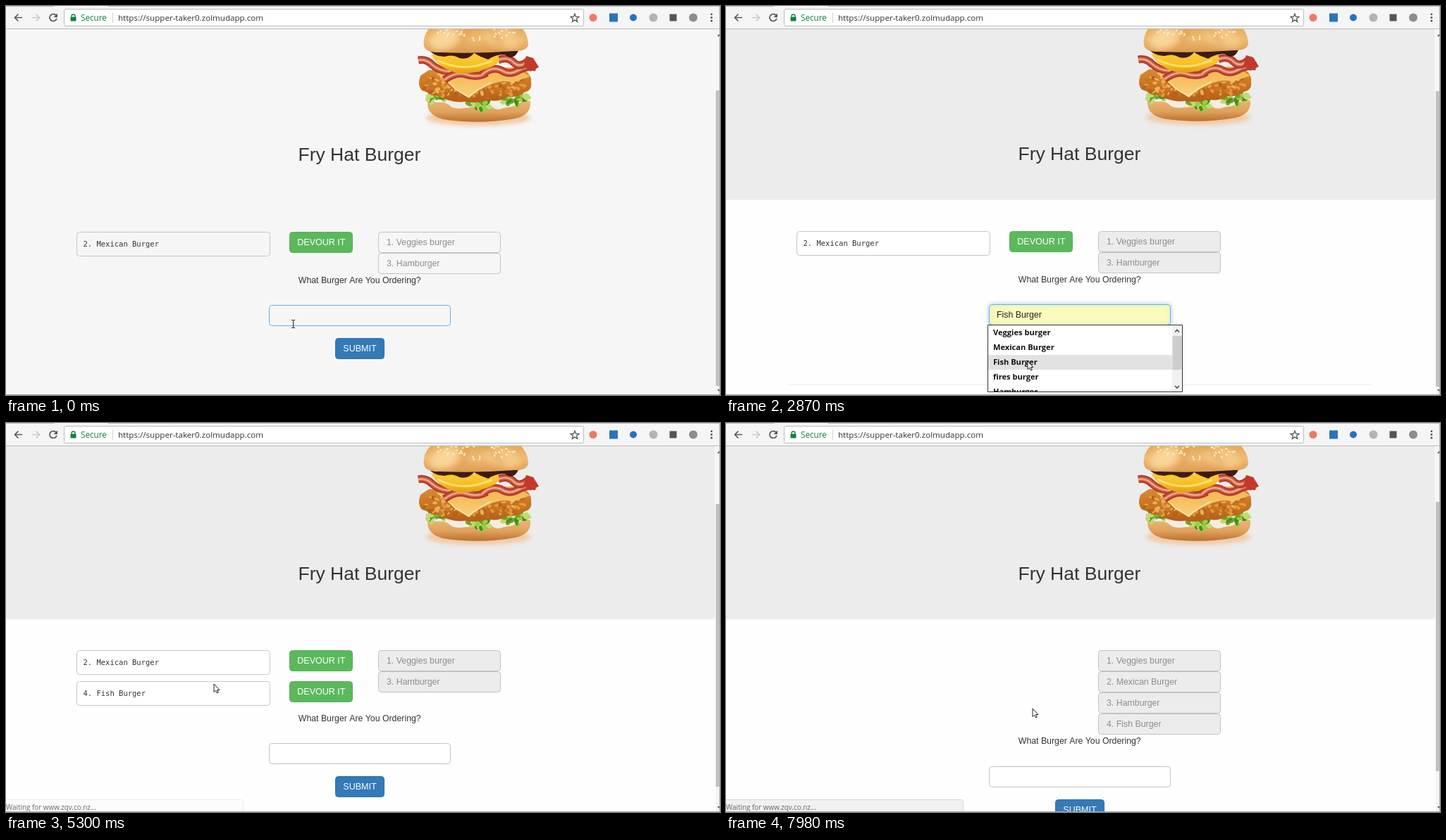
Animation, 1013 px wide and 553 px high, one loop 8000 ms. Source, as an HTML page with a canvas:

```html
<!DOCTYPE html>
<html lang="en">
<head>
<meta charset="utf-8">
<title>Burger list</title>
<style>
html, body { margin: 0; width: 100%; height: 100%; overflow: hidden; background: #fff; }
canvas { display: block; width: 1013px; height: 553px; }
</style>
</head>
<body>
<canvas id="stage" width="1013" height="553"></canvas>
<script>
const LOOP = 8000;
const W = 1013, H = 553;
const ctx = document.getElementById('stage').getContext('2d');

const SANS = '"Liberation Sans", Arial, sans-serif';
const UI = '"Open Sans", "Noto Sans", sans-serif';
const MONO = '"DejaVu Sans Mono", "Noto Sans Mono", monospace';
const HOST = 'supper-taker0.zolmudapp.com';
const WAIT_HOST = 'Waiting for ' + HOST + '...';
const WAIT_PIC = 'Waiting for www.zqv.co.nz...';
const CONNECT = 'Establishing secure connection...';

const VEG = '1. Veggies burger', MEX = '2. Mexican Burger';
const HAM = '3. Hamburger', FISH = '4. Fish Burger';
const CHOICES = ['Veggies burger', 'Mexican Burger', 'Fish Burger', 'fires burger', 'Hamburger'];

// Each page: start time, waiting burgers, eaten burgers, scrollbar thumb length and rate
const PAGES = [
  { at: 0, todo: [MEX], done: [VEG, HAM], thumb: 420, rate: 0.79 },
  { at: 4620, todo: [MEX, FISH], done: [VEG, HAM], thumb: 402, rate: 0.757 },
  { at: 6100, todo: [FISH], done: [VEG, MEX, HAM], thumb: 400, rate: 0.757 },
  { at: 7000, todo: [], done: [VEG, MEX, HAM, FISH], thumb: 383, rate: 0.72 }
];
const SCROLL = [[0, 91], [159, 91], [160, 92], [4619, 92], [4620, 0], [5140, 0], [5290, 88.5],
  [6099, 88.5], [6100, 0], [6190, 0], [6320, 88.5], [6999, 88.5], [7000, 0], [7250, 0], [7400, 88.5]];
const POINTER_X = [[160, 407], [860, 430], [1270, 430], [1850, 436], [2010, 436], [2440, 432],
  [2900, 428], [3540, 428], [3880, 484], [4500, 484], [4750, 293], [5140, 293], [5300, 295],
  [5450, 295], [5840, 416], [6900, 416], [7560, 443], [7860, 440], [7970, 435]];
const POINTER_Y = [[160, 452], [860, 440], [1270, 440], [1850, 436], [2010, 436], [2440, 462],
  [2900, 506], [3540, 506], [3880, 488], [4500, 488], [4750, 368], [5140, 368], [5300, 371],
  [5450, 371], [5840, 347], [6900, 347], [7560, 408], [7860, 408], [7970, 406]];
const POINTER_KIND = [[0, 'beam'], [2200, 'arrow'], [3800, 'hand'], [4620, 'arrow'], [5750, 'hand'], [6950, 'arrow']];
const STATUS = [[0, ''], [3950, WAIT_HOST, '#f2f2f2'], [4620, CONNECT, '#f2f2f2'], [5140, WAIT_PIC, '#fcfcfc'],
  [5570, ''], [5840, WAIT_HOST, '#f2f2f2'], [6190, WAIT_PIC, '#fcfcfc'], [6330, WAIT_HOST, '#fcfcfc'],
  [7000, CONNECT, '#f2f2f2'], [7250, WAIT_HOST, '#f1f1f1'], [7860, WAIT_PIC, '#f1f1f1']];
const BUSY = [[0, false], [3950, true], [5140, false], [5840, true], [6190, false], [6330, true], [7860, false]];

const lastOf = (list, t) => list.filter(k => k[0] <= t).pop();

function tween(keys, t) {
  if (t <= keys[0][0]) return keys[0][1];
  for (let i = 1; i < keys.length; i++) {
    const [a, va] = keys[i - 1], [b, vb] = keys[i];
    if (t < b) {
      const p = (t - a) / (b - a);
      return va + (vb - va) * p * p * (3 - 2 * p);
    }
  }
  return keys[keys.length - 1][1];
}

function rect(c, x, y, w, h) {
  ctx.fillStyle = c;
  ctx.fillRect(x, y, w, h);
}

function box(x, y, w, h, r, fill, line) {
  ctx.beginPath();
  ctx.roundRect(x, y, w, h, r);
  if (fill) { ctx.fillStyle = fill; ctx.fill(); }
  if (line) { ctx.strokeStyle = line; ctx.lineWidth = 1; ctx.stroke(); }
}

function text(s, x, y, size, font, color, weight = 400) {
  ctx.font = `${weight} ${size}px ${font}`;
  ctx.fillStyle = color;
  ctx.fillText(s, x, Math.round(y));
}

function shape(g, d, fill, line, width = 1) {
  const p = new Path2D(d);
  if (fill) { g.fillStyle = fill; g.fill(p); }
  if (line) { g.strokeStyle = line; g.lineWidth = width; g.stroke(p); }
}

function oval(g, x, y, rx, ry, fill, turn = 0) {
  g.beginPath();
  g.ellipse(x, y, rx, ry, turn, 0, Math.PI * 2);
  g.fillStyle = fill;
  g.fill();
}

function shade(g, y0, y1, ...colors) {
  const s = g.createLinearGradient(0, y0, 0, y1);
  colors.forEach((c, i) => s.addColorStop(i / (colors.length - 1), c));
  return s;
}

function makeBurger() {
  const c = document.createElement('canvas');
  c.width = 190; c.height = 175;
  const g = c.getContext('2d');
  let seed = 7;
  const rnd = () => (seed = seed * 16807 % 2147483647) / 2147483647;
  const between = (a, b) => a + (b - a) * rnd();
  // Scatters n points inside an ellipse
  const scatter = (n, x, y, rx, ry, paint) => {
    for (let i = 0; i < n; i++) {
      const a = between(0, Math.PI * 2), r = Math.sqrt(rnd());
      paint(x + rx * r * Math.cos(a), y + ry * r * Math.sin(a), a, i);
    }
  };
  g.translate(-575, -95);
  g.lineJoin = 'round';

  // Plate glow and lower bun
  g.save();
  g.filter = 'blur(3px)';
  oval(g, 670, 250, 74, 11, '#f0c8a2');
  g.restore();
  shape(g, 'M598 228L744 226Q746 246 722 251Q672 260 620 252Q597 246 598 228Z', shade(g, 228, 256, '#e9b472', '#e0a05a', '#b8702f'));
  // Sauce and lettuce
  shape(g, 'M608 222L736 220Q732 233 706 236Q695 241 688 233L652 236Q634 239 628 231Z', '#f1eee4');
  const leaf = (x, y, rx, ry, n) => scatter(n, x, y, rx, ry, (px, py, a, i) =>
    oval(g, px, py, between(3, 6), between(2, 4), ['#6da52c', '#9ccb46', '#4d8a1e', '#bddc72'][i % 4], a));
  leaf(611, 222, 17, 9, 26);
  leaf(669, 232, 19, 7, 24);
  leaf(721, 224, 22, 10, 32);
  // Patty
  shape(g, 'M588 190Q583 204 590 211Q598 213 604 218Q615 218 622 223Q640 229 650 227Q668 230 684 225Q700 228 712 220Q728 221 735 214Q747 211 745 199Q746 190 738 184L600 182Z',
    shade(g, 182, 228, '#d98a33', '#c9731f', '#b35f17'));
  scatter(190, 666, 203, 75, 20, (x, y, a, i) =>
    oval(g, x, y, between(1, 4.5), between(1, 3), ['#e39a41', '#b7611c', '#efb05a', '#cb7624'][i % 4], a));
  // Cheese
  shape(g, 'M611 188Q626 198 637 210L657 222Q668 211 686 203Q708 195 718 200L744 191L722 178L620 180Z', shade(g, 180, 222, '#f0b54e', '#fbd07c'));
  shape(g, 'M616 190Q630 200 638 209L656 220Q668 209 688 200', null, '#ffe5a6', 1.5);
  // Bacon
  const strips = ['M585 168Q596 166 604 174Q614 183 628 184', 'M622 196Q638 184 652 188Q668 194 682 186',
    'M674 190Q688 176 702 182Q714 190 726 183Q738 176 752 178', 'M698 168Q712 162 721 172Q730 180 742 168'];
  for (const s of strips) {
    shape(g, s, null, '#b23a2c', 11);
    shape(g, s, null, '#d3614b', 6);
    shape(g, s, null, '#edb191', 2.2);
  }
  shape(g, 'M738 162L748 165L756 178L744 184L734 177Z', '#c23a2b');
  // Pineapple and dark sauce
  shape(g, 'M603 160Q640 156 698 162Q704 170 690 177Q668 187 645 187Q617 183 603 160Z', shade(g, 160, 188, '#f9cb33', '#f7c027', '#e29a17'));
  shape(g, 'M612 168Q639 182 668 176L690 169', null, '#fde06a', 3);
  shape(g, 'M599 151L728 150Q726 160 720 163Q714 166 708 160Q694 160 684 167Q674 164 664 158Q656 168 643 165Q634 159 622 163Q604 162 599 151Z', '#3d1a15');
  // Upper bun
  const bun = 'M593 148C589 119 622 101 666 100C711 100 742 118 741 147Q737 156 721 155Q669 159 617 157Q596 158 593 148Z';
  shape(g, bun, shade(g, 100, 158, '#e9b269', '#e7a855', '#efba73', '#dc9c50'));
  g.save();
  g.clip(new Path2D(bun));
  g.filter = 'blur(5px)';
  oval(g, 622, 138, 22, 14, '#f8d598', -0.4);
  oval(g, 704, 137, 27, 12, '#f5ca87', 0.3);
  shape(g, 'M666 112Q650 121 648 148M668 112Q690 121 704 147', null, '#d48c3f', 3);
  g.restore();
  scatter(75, 667, 122, 62, 19, (x, y, a) => oval(g, x, y, 1.9, 1.2, '#fbe8bd', a));
  return c;
}
const burger = makeBurger();

function field(x, y, w, h, fill, line) {
  box(x + 0.5, y + 0.5, w - 1, h - 1, 4, fill, line);
}

function button(label, x, y, w, color, edge) {
  box(x + 0.5, y + 0.5, w - 1, 29, 4, color, edge);
  text(label, x + 11.3, y + 19, 12.5, SANS, '#fff');
}

function drawPage(t) {
  const page = PAGES.filter(p => p.at <= t).pop();
  const top = 412 - tween(SCROLL, t);
  const row = Math.floor(top);
  const flat = t < 160;
  const first = page === PAGES[0];
  const grey = flat ? '#f6f6f6' : '#ececec';
  const paper = flat ? '#f6f6f6' : '#fefefe';

  rect(paper, 0, 33, W, H - 33);
  box(-4, top - 360.5, 1010, 316, 5, grey);
  ctx.drawImage(burger, 575, Math.round(top - 317));
  text('Fry Hat Burger', 414.5, top - 101, 26.5, SANS, '#333');

  page.todo.forEach((name, i) => {
    const y = row + i * 44;
    const fresh = t >= 4620 && t < 5140;
    field(100, y, 275, 35, fresh ? '#f3f3f3' : flat ? paper : '#fff', '#c6c6c6');
    if (fresh) rect('#fdfdfd', 101, y + 1, 219, i ? 18 : 33);
    text(name, 109.5, y + 21, 10.5, MONO, '#333');
    button('DEVOUR IT', 402, y, 90, '#5cb85c', '#56b256');
  });
  page.done.forEach((name, i) => {
    const y = row + i * 30;
    field(528, y, 174, 30, grey, '#c2c2c2');
    text(name, 540, y + 19, 12.35, SANS, '#8d8d8d');
  });

  const end = top + Math.max(page.done.length * 30, page.todo.length * 43.7);
  text('What Burger Are You Ordering?', 414.8, end + 12.8, 12.3, SANS, '#333');

  const y = Math.round(end + 44);
  const open = t >= 1270 && t < 3240;
  const px = tween(POINTER_X, t), py = tween(POINTER_Y, t);
  const hover = open && py > 455 ? Math.floor((py - 453.5) / 21) : -1;
  const filled = first && t >= 3240;
  const value = filled ? CHOICES[2] : hover >= 0 ? CHOICES[hover] : '';
  const focus = first && t < 3900;
  ctx.save();
  if (focus && !flat) { ctx.shadowColor = 'rgba(102,175,233,.6)'; ctx.shadowBlur = 6; }
  field(373, y, 258, 30, value ? '#fafbbd' : flat ? paper : '#fff', focus ? '#66afe9' : '#c2c2c2');
  ctx.restore();
  if (value) text(value, 384, y + 18.7, 12.35, SANS, '#222');
  else if (first && t >= 860) rect('#555', 384, y + 8, 1, 14);

  const pressed = first && t >= 3880;
  button('SUBMIT', 467, y + 47, 70, pressed ? '#286090' : '#337ab7', pressed ? '#4d83bd' : '#2e70a9');
  if (!flat) rect('#eee', 88, y + 114, 829, 1);
  if (open) drawChoices(hover);
  drawScrollbar(48 + (412 - top) * page.rate, page.thumb);
  return [px, py];
}

function drawChoices(hover) {
  box(371.5, 453.5, 276, 95, 0, '#fff', '#333');
  ctx.save();
  ctx.beginPath();
  ctx.rect(372, 454, 275, 94);
  ctx.clip();
  if (hover >= 0) rect('#e2e2e2', 372, 454 + hover * 21, 261, 21);
  CHOICES.forEach((name, i) => text(name, 379, 468 + i * 21.1, 11.1, UI, '#111', 700));
  rect('#f1f1f1', 633, 454, 14, 95);
  rect('#cdcdcd', 633.5, 469, 13, 48);
  shape(ctx, 'M637 463.5L640 460.5L643 463.5M637 540L640 543L643 540', null, '#505050', 1.6);
  ctx.restore();
}

function drawScrollbar(y, len) {
  rect('#f5f5f5', 1007, 34, 6, 518);
  rect('#c1c1c1', 1007, Math.round(y), 6, len);
  shape(ctx, 'M1009 43L1011.5 40L1013 43ZM1009 545L1011.5 548L1013 545Z', '#555');
}

function drawToolbar(busy) {
  rect('#f5f5f5', 0, 0, W, 33);
  rect('#b9b9b9', 0, 0, 68, 1);
  rect('#b9b9b9', 145, 0, W - 145, 1);
  rect('#bababa', 0, 32, W, 1);
  box(82.5, 4.5, 737, 24, 2, '#fff', '#bcbcbc');
  shape(ctx, 'M23 16.5H12.5M17.5 11.5L12.5 16.5L17.5 21.5', null, '#5a5a5a', 1.7);
  shape(ctx, 'M37 16.5H47.5M42.5 11.5L47.5 16.5L42.5 21.5', null, '#c9c9c9', 1.6);
  if (busy) {
    shape(ctx, 'M62.5 12L72 21.5M72 12L62.5 21.5', null, '#4c4c4c', 1.8);
  } else {
    ctx.beginPath();
    ctx.arc(67, 16.5, 5, 0.25, 5.5);
    ctx.strokeStyle = '#555';
    ctx.lineWidth = 1.7;
    ctx.stroke();
    shape(ctx, 'M73 10.5V16H67.5Z', '#555');
  }
  box(91.5, 15.5, 8, 6, 1, '#0b8043');
  shape(ctx, 'M93 16V14.5A2.5 2.5 0 0 1 98 14.5V16', null, '#0b8043', 1.3);
  text('Secure', 106, 21, 11.7, UI, '#0b8043');
  rect('#cfcfcf', 151, 10, 1, 14);
  text('https://' + HOST, 159, 21, 11.6, UI, '#333');

  ctx.beginPath();
  for (let i = 0; i < 10; i++) {
    const a = -Math.PI / 2 + i * Math.PI / 5, r = i % 2 ? 2.7 : 6.2;
    ctx.lineTo(807 + r * Math.cos(a), 17.3 + r * Math.sin(a));
  }
  ctx.closePath();
  ctx.strokeStyle = '#444';
  ctx.lineWidth = 1.2;
  ctx.stroke();
  oval(ctx, 833, 16.5, 5.5, 5.5, '#ef7a62');
  rect('#2d73ba', 856, 10.5, 12, 12);
  oval(ctx, 890, 16.5, 5, 5, '#2472c0');
  oval(ctx, 918.5, 16.5, 6, 6, '#b3b3b3');
  rect('#555', 941.5, 11.5, 10, 10);
  oval(ctx, 975, 16.5, 6, 6, '#8d8d8d');
  for (const y of [11.8, 16.5, 21.2]) oval(ctx, 1001, y, 1.4, 1.4, '#505050');
}

function drawStatus([, label, fill]) {
  if (!label) return;
  box(-4.5, 535.5, 341, 24, 3, fill, fill === '#fcfcfc' ? '#ececec' : '#d5d5d5');
  text(label, 0, 549.5, 9.9, UI, '#666');
}

function drawPointer(kind, x, y) {
  ctx.save();
  ctx.translate(Math.round(x), Math.round(y));
  ctx.lineJoin = 'round';
  if (kind === 'beam') {
    shape(ctx, 'M-2 -5.5H0L0.5 -5L1 -5.5H3M0.5 -5V5M-2 5.5H0L0.5 5L1 5.5H3', null, '#222');
  } else if (kind === 'arrow') {
    shape(ctx, 'M0 0V11.5L2.6 9.2L4.5 13L6.3 12.2L4.5 8.5H8Z', '#fff', '#222');
  } else {
    shape(ctx, 'M-1.2 9V1Q0 -1 1.2 1V5.5Q2.8 4.5 3.5 6Q5 5 5.8 6.5Q7.5 6 8 8V11Q8 13.5 6.5 16H0Q-0.7 13.5 -3.5 10.5Q-4.2 8 -1.2 9.7Z', '#fff', '#222', 1.1);
    shape(ctx, 'M1.2 5.5V8M3.5 6V8.5M5.8 6.5V9', null, '#222', 0.8);
  }
  ctx.restore();
}

function draw(t) {
  const [x, y] = drawPage(t);
  drawToolbar(lastOf(BUSY, t)[1]);
  drawStatus(lastOf(STATUS, t));
  rect('#a6a6a6', 0, 552, W, 1);
  rect('#b0b0b0', 1012, 0, 1, H);
  drawPointer(lastOf(POINTER_KIND, t)[1], x, y);
}

const start = performance.now();
function frame() {
  draw((performance.now() - start) % LOOP);
  requestAnimationFrame(frame);
}
frame();
</script>
</body>
</html>
```
